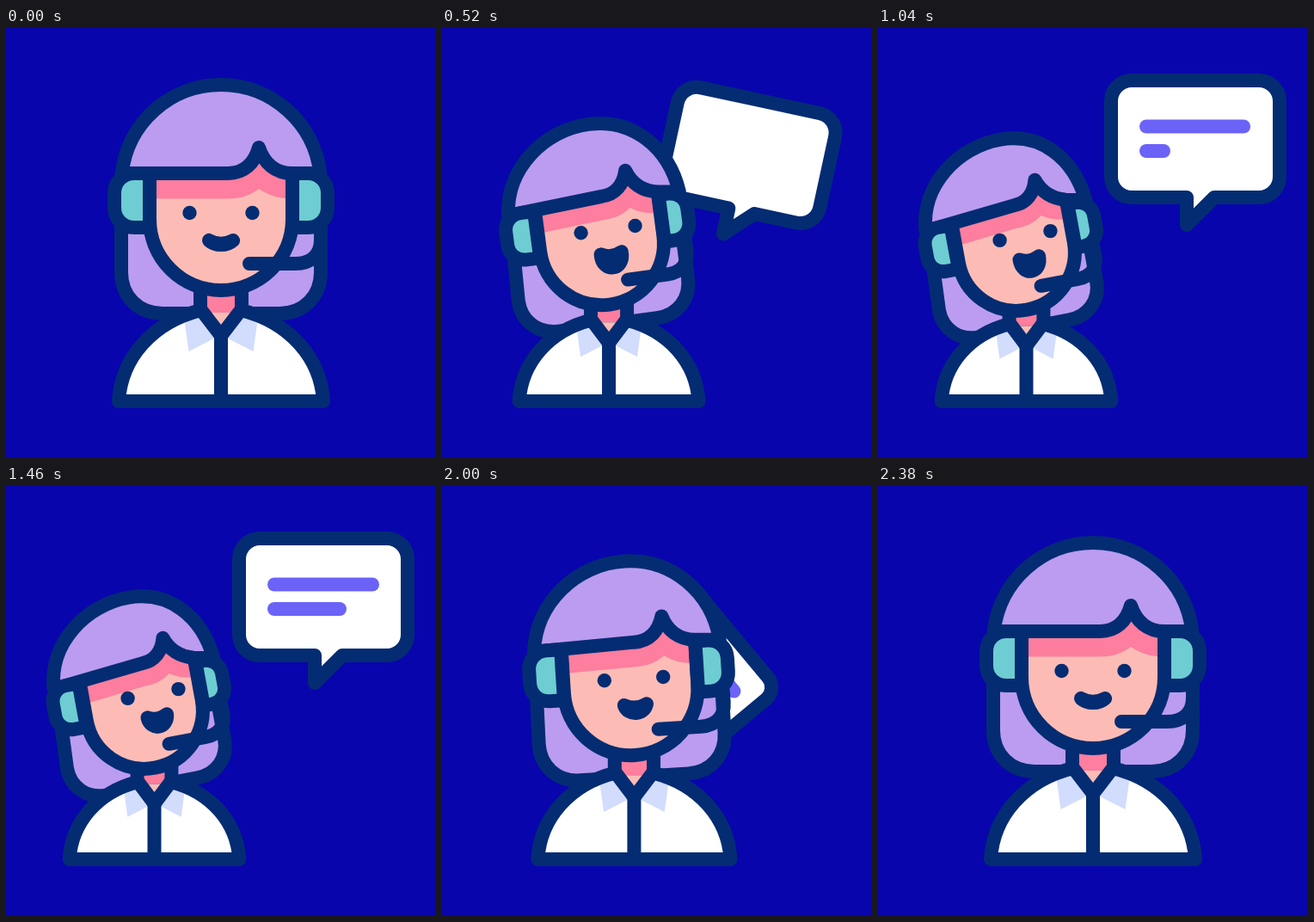
Animation of 500x500 px, one loop 2400 ms. Source, as an HTML page with a canvas:

```html
<!DOCTYPE html>
<html lang="en">
<head>
<meta charset="utf-8">
<title>Support agent</title>
<style>
  html, body { margin: 0; width: 100%; height: 100%; overflow: hidden; background: #0805ad; }
  canvas { display: block; width: 500px; height: 500px; }
</style>
</head>
<body>
<canvas id="stage" width="500" height="500"></canvas>
<script>
const ctx = document.getElementById('stage').getContext('2d');
const LOOP = 2400;
const COLOR = {
  back: '#0805ad', line: '#042c72', hair: '#bb9cf0', skin: '#fcbcb5',
  shade: '#fd7e9e', ear: '#6dcdd2', collar: '#d2dcfc', text: '#6b63f8', white: '#ffffff'
};

// Lean towards the speaking pose: 0 at rest, 1 when speaking.
const LEAN = [[100, 0], [380, .29], [540, .77], [660, .978], [800, 1],
  [1600, 1], [1780, .93], [2000, .345], [2180, .045], [2380, 0]];
const MOUTH = [[100, 5], [380, 9], [660, 23], [940, 12.5], [1220, 23],
  [1480, 12.5], [1780, 22], [2000, 10], [2380, 5]];
// time, x, y, degrees, size
const BUBBLE = [
  [200, 279, 265, 90, .66], [380, 306, 226, 63, .76], [540, 360, 143, 9, .97],
  [660, 369, 132, 1.8, 1], [780, 369, 129, 0, 1], [1470, 369, 129, 0, 1],
  [1630, 349, 126, -13, .95], [1780, 340, 141, -10, .88],
  [2000, 303.5, 212, 50, .76], [2180, 279, 262, 88, .68]];
const LINES = [
  { y: -14.5, length: 114, keys: [[700, 0], [1060, 1]] },
  { y: 14, length: 76, keys: [[920, 0], [1280, 1]] }];

// Smooth interpolation through keys without overshoot.
function track(keys, t, col = 1) {
  const last = keys.length - 1;
  if (t <= keys[0][0]) return keys[0][col];
  if (t >= keys[last][0]) return keys[last][col];
  let i = 0;
  while (t >= keys[i + 1][0]) i++;
  const slope = k => (keys[k + 1][col] - keys[k][col]) / (keys[k + 1][0] - keys[k][0]);
  const tangent = k => {
    if (k === 0 || k === last) return 0;
    const a = slope(k - 1), b = slope(k);
    return a * b <= 0 ? 0 : 2 * a * b / (a + b);
  };
  const span = keys[i + 1][0] - keys[i][0];
  const u = (t - keys[i][0]) / span, v = 1 - u;
  return keys[i][col] * v * v * (1 + 2 * u) + keys[i + 1][col] * u * u * (3 - 2 * u)
    + span * (tangent(i) * u * v * v - tangent(i + 1) * u * u * v);
}

// Path builder: maps design points to the stage.
function pen(map) {
  const flat = pts => {
    const out = [];
    for (let i = 0; i < pts.length; i += 2) out.push(...map(pts[i], pts[i + 1]));
    return out;
  };
  const api = {
    begin() { ctx.beginPath(); return api; },
    move(...p) { ctx.moveTo(...flat(p)); return api; },
    line(...p) {
      const f = flat(p);
      for (let i = 0; i < f.length; i += 2) ctx.lineTo(f[i], f[i + 1]);
      return api;
    },
    quad(...p) { ctx.quadraticCurveTo(...flat(p)); return api; },
    curve(...p) { ctx.bezierCurveTo(...flat(p)); return api; },
    close() { ctx.closePath(); return api; }
  };
  return api;
}

function fill(color) {
  ctx.fillStyle = color;
  ctx.fill();
}

function stroke(color = COLOR.line) {
  ctx.strokeStyle = color;
  ctx.stroke();
}

function dot(x, y, r) {
  ctx.beginPath();
  ctx.arc(x, y, r, 0, Math.PI * 2);
  fill(COLOR.line);
}

function drawBubble(t) {
  const [x, y, deg, size] = [1, 2, 3, 4].map(col => track(BUBBLE, t, col));
  const w = 98 * size, h = 68 * size, r = 24 * size;
  ctx.save();
  ctx.translate(x, y);
  ctx.rotate(deg * Math.PI / 180);
  ctx.beginPath();
  ctx.moveTo(0, -h);
  ctx.arcTo(w, -h, w, h, r);
  ctx.arcTo(w, h, -w, h, r);
  ctx.lineTo(22 * size, h);
  ctx.lineTo(-10 * size, 100 * size);
  ctx.lineTo(-10 * size, h);
  ctx.arcTo(-w, h, -w, -h, r);
  ctx.arcTo(-w, -h, w, -h, r);
  ctx.closePath();
  fill(COLOR.white);
  stroke();
  for (const row of LINES) {
    const shown = track(row.keys, t);
    if (shown <= 0) continue;
    ctx.beginPath();
    ctx.moveTo(-57 * size, row.y * size);
    ctx.lineTo((-57 + row.length * shown) * size, row.y * size);
    stroke(COLOR.text);
  }
  ctx.restore();
}

function drawBody(p) {
  const kx = 1 - .17 * p, ky = 1 - .15 * p;
  const body = pen((x, y) => [250 - 77.5 * p + (x - 250) * kx, 434 + (y - 434) * ky]);

  body.begin().move(226, 290).line(274, 290, 274, 331, 226, 331).close();
  fill(COLOR.shade);
  body.begin().move(226, 331).line(274, 331, 250, 358).close();
  fill(COLOR.skin);
  body.begin().move(226, 290).line(226, 328).move(274, 290).line(274, 328);
  stroke();

  const torso = () => body.begin().move(131, 434)
    .curve(134, 384, 170, 342, 227, 328).line(250, 358, 273, 328)
    .curve(330, 342, 366, 384, 369, 434).close();
  torso();
  fill(COLOR.white);
  for (const side of [-1, 1]) {
    const x = d => 250 + side * d;
    body.begin().move(x(43), 337).line(x(37.5), 376, x(8), 361, x(22), 330).close();
    fill(COLOR.collar);
  }
  torso();
  stroke();
  body.begin().move(250, 358).line(250, 434);
  stroke();
}

// Head coordinates with a drift (dx, dy) for parallax while turning.
function headMap(p, dx = 0, dy = 0) {
  const a = -10.4 * p * Math.PI / 180, s = 1 - .18 * p;
  const c = Math.cos(a) * s, n = Math.sin(a) * s;
  return (x, y) => [
    250 - 94 * p + (x - 250) * c - (y - 200) * n + dx * p,
    200 + 42 * p + (x - 250) * n + (y - 200) * c + dy * p];
}

function drawBackHair(p) {
  const left = pen(headMap(p, -4, 1)), right = pen(headMap(p, -8, 1));
  pen(headMap(p)).begin().move(134, 180);
  left.line(134, 284).curve(134, 312, 154, 332, 182, 332);
  right.line(318, 332).curve(346, 332, 366, 312, 366, 284).line(366, 180).close();
  fill(COLOR.hair);
  stroke();
}

function drawFace(p, depth) {
  const s = 1 - .18 * p, tilt = -10.4 * p * Math.PI / 180;
  const map = headMap(p, 1.5, 1), base = pen(map);
  const [cx, cy] = map(250, 222);
  const outline = () => {
    base.begin().move(333, 169);
    ctx.arc(cx, cy, 83 * s, tilt, tilt + Math.PI);
    base.line(167, 169);
  };
  outline();
  fill(COLOR.skin);

  const shade = pen(headMap(p, 0, -7));
  base.begin().move(167, 160).line(167, 198.5);
  shade.line(258, 198.5).curve(276, 198.5, 286, 193, 294, 187)
    .curve(303, 193, 314, 198.5, 333, 198.5).line(333, 139, 258, 139).close();
  fill(COLOR.shade);
  outline();
  stroke();

  const look = headMap(p, 12.8, -12.6), mouth = pen(look);
  for (const x of [213.5, 286.5]) dot(...look(x, 215), 8.2);

  const low = 247 + depth / s * 1.33, bend = 3 + .75 * depth;
  mouth.begin().move(236, 247).quad(250, 254.5, 264, 247)
    .curve(250 + bend, low, 250 - bend, low, 236, 247).close();
  fill(COLOR.white);
  stroke();
}

function drawFringe(p) {
  const at = (x, y, dx, dy) => headMap(p, dx, dy)(x, y);
  ctx.beginPath();
  ctx.moveTo(...at(134.7, 169, -3, 2));
  ctx.bezierCurveTo(...at(141.3, 110.3, -5, -4), ...at(191, 66, 5, -4), ...at(250, 66, 5, -4));
  ctx.bezierCurveTo(...at(309, 66, 5, -4), ...at(358.7, 110.3, -3, -3), ...at(365.3, 169, -3, 0));
  ctx.lineTo(...at(333, 169, 0, -5));
  pen(headMap(p, 0, -9.5)).curve(313, 169, 300, 157, 294, 139)
    .curve(289, 157, 277, 169, 258, 169).close();
  fill(COLOR.hair);
  stroke();
}

function drawHeadset(p) {
  const ear = (map, inner, outer) => {
    const side = Math.sign(outer - inner), bend = outer - side * 23, knot = outer - side * 10;
    pen(map).begin().move(inner, 169).line(bend, 169)
      .curve(knot, 169, outer, 179, outer, 192).line(outer, 209)
      .curve(outer, 222, knot, 232, bend, 232).line(inner, 232).close();
    fill(COLOR.ear);
    stroke();
  };
  ear(headMap(p), 167, 126);
  ear(headMap(p, 2, 0), 333, 374 - 7 * p);
  pen(headMap(p, -4, 3)).begin().move(283, 274).line(336, 274)
    .curve(355, 274, 366, 263, 366, 246).line(366, 232);
  stroke();
}

function draw(t) {
  const p = track(LEAN, t);
  ctx.fillStyle = COLOR.back;
  ctx.fillRect(0, 0, 500, 500);
  ctx.lineWidth = 16;
  ctx.lineCap = ctx.lineJoin = 'round';
  drawBubble(t);
  drawBackHair(p);
  drawBody(p);
  drawFace(p, track(MOUTH, t));
  drawFringe(p);
  drawHeadset(p);
}

const start = performance.now();
function frame() {
  draw((performance.now() - start) % LOOP);
  requestAnimationFrame(frame);
}
frame();
</script>
</body>
</html>
```
